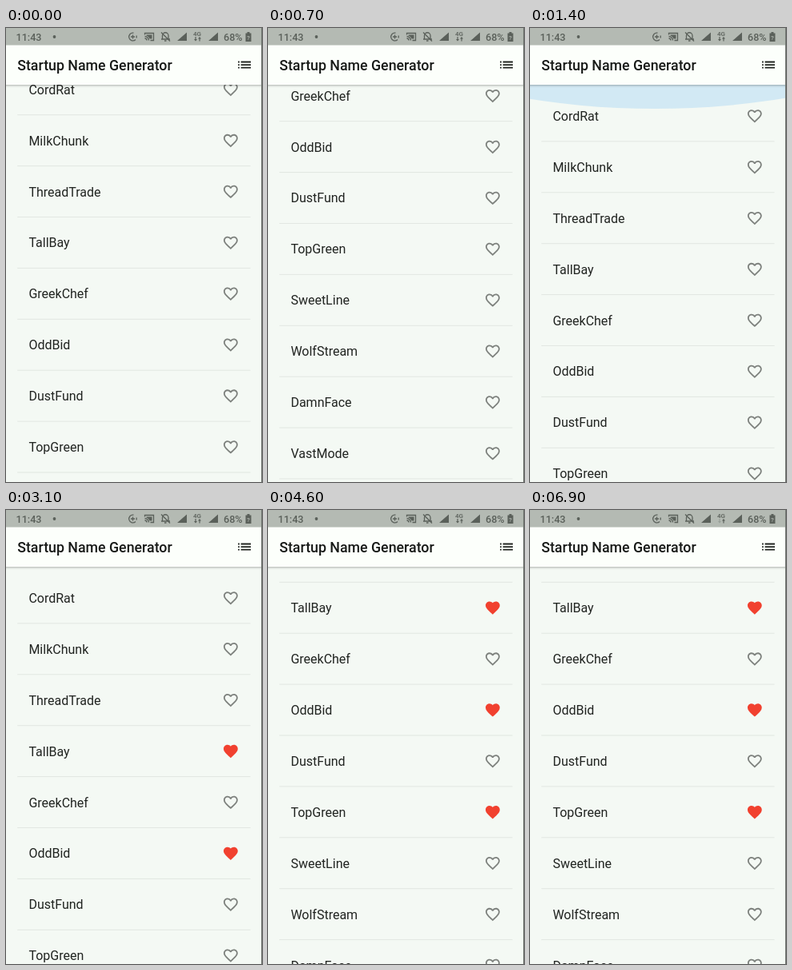
Recreate the animation shown at these times as an HTML page. Size 320 px wide and 568 px high, loop 7.4 s.

```html
<!DOCTYPE html>
<html lang="en">
<head>
<meta charset="utf-8">
<title>Startup Name Generator</title>
<style>
  html, body { margin: 0; width: 100%; height: 100%; overflow: hidden; background: #f4f9f4; }
  svg { display: block; width: 320px; height: 568px; font: 16px Roboto, sans-serif; fill: #212421; }
  .title { font-size: 17.78px; font-weight: 500; fill: #171917; }
  .rule { fill: #e2e7e2; }
  .bar { fill: #fcfffb; filter: drop-shadow(0 1.5px 1.5px rgba(0, 0, 0, .3)); }
  .status { fill: #5a605a; font-size: 12.6px; font-weight: 500; }
  .small { font-size: 8px; }
  .line { fill: none; stroke: #5a605a; stroke-width: 1.3; }
</style>
</head>
<body>
<svg viewBox="0 0 320 568">
  <rect width="320" height="568" fill="#f4f9f4"/>
  <g id="home"></g>
  <g id="saved"></g>
  <ellipse id="glow" cx="156" rx="480" fill="#2196f3"/>
  <rect class="bar" x="-5" y="10" width="330" height="61"/>
  <g id="homeBar">
    <text class="title" x="14.2" y="52.5">Startup Name Generator</text>
    <path transform="translate(287.4 35.4) scale(.889)" d="M3 13h2v-2H3zm0 4h2v-2H3zm0-8h2V7H3zm4 4h14v-2H7zm0 4h14v-2H7zM7 7v2h14V7z"/>
  </g>
  <g id="savedBar">
    <text class="title" x="64" y="52.5">Saved Suggestions</text>
    <path transform="translate(14.3 35.4) scale(.889)" d="M20 11H7.83l5.59-5.59L12 4l-8 8 8 8 1.41-1.41L7.83 13H20z"/>
  </g>
  <rect width="320" height="21.5" fill="#b4bab3"/>
  <g class="status">
    <text x="12.5" y="16">11:43</text>
    <circle cx="60.5" cy="11" r="1.9"/>
    <path class="line" d="M162 14.5a4.9 4.9 0 1 1-2.500-8.300M163 9.500a4.900 4.900 0 0 1 0 3M156 11h5m-2.500-2.500v5"/>
    <path class="line" d="M173.500 8.500v-2h11v9h-4M173.500 10.500a5 5 0 0 1 5 5M173.500 13a2.500 2.500 0 0 1 2.500 2.500"/>
    <path d="M175.500 8.500h7v5h-3q-1-3-4-4z"/>
    <path class="line" d="M195.500 14h7.500V9.500a3.600 3.600 0 0 0-7.500 0V14M194 14h11M194 5.500l11 11M198 16h2.500"/>
    <path d="M226 5.500V16h-12zM265 5.500V16h-12z"/>
    <text class="small" x="234" y="10.2">4G</text>
    <path id="down" d="M236.400 11h1.200v3h1.400l-2 2.500-2-2.500h1.400z"/>
    <path d="M241.400 16.500h1.200v-3h1.400l-2-2.500-2 2.500h1.400z"/>
    <text x="272" y="16">68%</text>
    <path d="M299.500 6.500h2V5h3v1.500h2V17h-7z"/>
    <text class="small" x="301" y="15" fill="#b4bab3">?</text>
  </g>
  <rect x="319" width="1" height="568" fill="#737873"/>
</svg>
<script>
const LOOP = 7400, STEP = 100, PITCH = 63.9;
const names = ['CordRat', 'MilkChunk', 'ThreadTrade', 'TallBay', 'GreekChef', 'OddBid', 'DustFund',
  'TopGreen', 'SweetLine', 'WolfStream', 'DamnFace', 'VastMode', 'ColdPoint', 'FirmBase'];
const favourites = ['BestFlash', 'BroadPass', 'SelfBoard', 'TallBay', 'OddBid', 'MilkChunk', 'TopGreen'];
const likedAt = { TallBay: 2100, OddBid: 3100, MilkChunk: 3800, TopGreen: 4600 };

const heart = 'M12 21.35l-1.45-1.32C5.4 15.36 2 12.28 2 8.5 2 5.42 4.42 3 7.5 3c1.74 0 3.41.81 4.5 2.09C13.09 3.81 14.76 3 16.5 3 19.58 3 22 5.42 22 8.5c0 3.78-3.4 6.86-8.55 11.54z';
const hollow = 'M12.1 18.55l-.1.1-.11-.1C7.14 14.24 4 11.39 4 8.5 4 6.5 5.5 5 7.5 5c1.54 0 3.04.99 3.57 2.36h1.87C13.46 5.99 14.96 5 16.5 5c2 0 3.5 1.5 3.5 3.5 0 2.89-3.14 5.74-7.9 10.05z';

const $ = id => document.getElementById(id);
const show = (id, visible) => $(id).setAttribute('display', visible ? 'inline' : 'none');

// Eased 0 to 1 progress of a move
function ease(t, from, to) {
  const p = Math.min(1, Math.max(0, (t - from) / (to - from)));
  return p * p * (3 - 2 * p);
}

// Centre of the first row: two swipes up, a fling back to the top, a last swipe up
const scroll = t => 77 - 55 * ease(t, 0, 200) - 228.3 * ease(t, 400, 800)
  + 316.5 * ease(t, 800, 1300) - 179.4 * ease(t, 3812, 4205);

$('home').innerHTML = names.map((name, i) => `<g transform="translate(0 ${i * PITCH})">
  <text x="28.4" y="5.7">${name}</text>
  <rect class="rule" x="14.2" y="31.2" width="291.4" height="1"/>
  <path transform="translate(270.2 -10.7) scale(.889)" fill-rule="evenodd"/></g>`).join('');
const hearts = [...$('home').querySelectorAll('path')];

$('saved').innerHTML = favourites.map((name, i) => {
  const y = 96 + i * 49.7;
  const rule = i < favourites.length - 1 ? `<rect class="rule" y="${y + 24.3}" width="320" height="1"/>` : '';
  return `<text x="14.2" y="${y + 5.5}">${name}</text>${rule}`;
}).join('');

function draw(now) {
  const t = Math.floor(now % LOOP / STEP) * STEP;
  const onSaved = t >= 5400 && t < 6400;
  for (const id of ['home', 'homeBar']) show(id, !onSaved);
  for (const id of ['saved', 'savedBar']) show(id, onSaved);

  $('home').setAttribute('transform', `translate(0 ${scroll(t)})`);
  hearts.forEach((path, i) => {
    const liked = t >= likedAt[names[i]];
    path.setAttribute('d', liked ? heart : heart + hollow);
    path.setAttribute('fill', liked ? '#f1412f' : '#7d817d');
  });

  // Overscroll glow: a flattened circle hanging from the app bar
  const glow = ease(t, 1200, 1400) - ease(t, 1400, 1700), squash = .47 * glow;
  $('glow').setAttribute('cy', 71 - 416 * squash);
  $('glow').setAttribute('ry', 480 * squash);
  $('glow').setAttribute('opacity', .16 * glow);
  $('down').setAttribute('opacity', t >= 5200 ? .3 : 1);
}

const start = performance.now();
(function tick() {
  draw(performance.now() - start);
  requestAnimationFrame(tick);
})();
</script>
</body>
</html>
```
